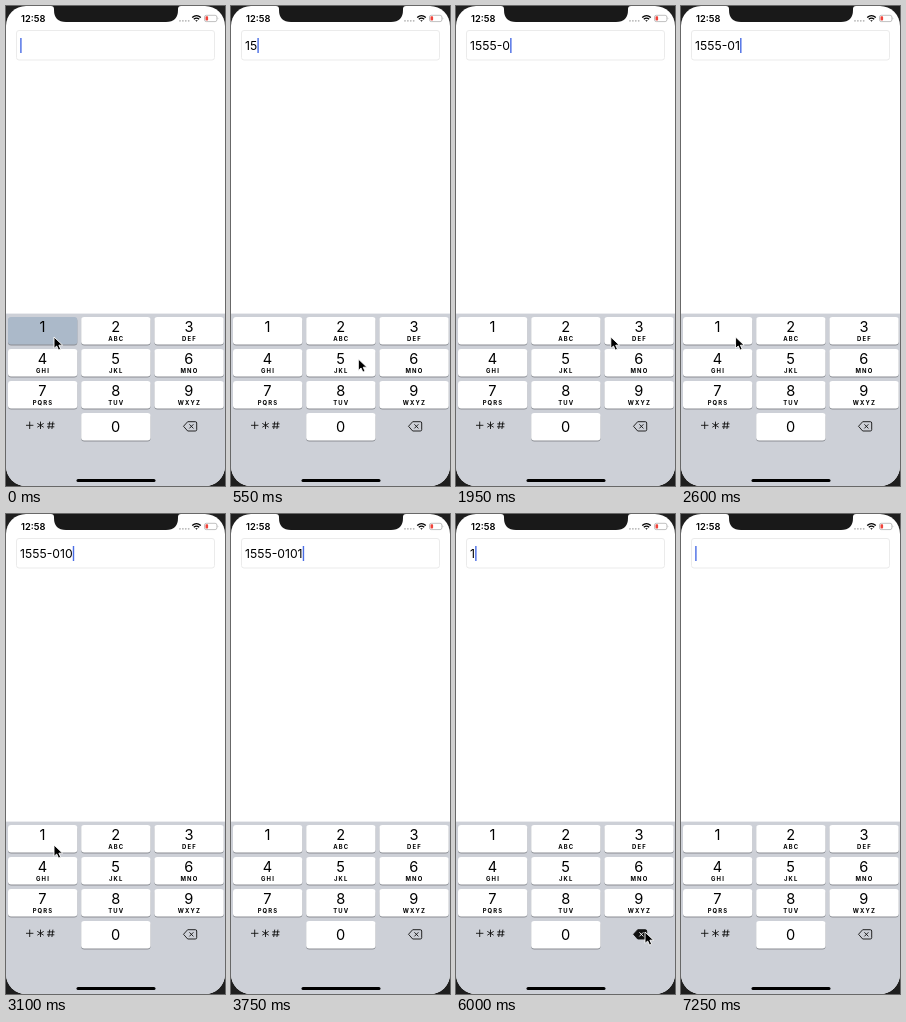
An HTML page that plays this animation: 219 by 480 pixels, repeating every 7350 ms.

```html
<!DOCTYPE html>
<html lang="en">
<head>
<meta charset="utf-8">
<title>Phone number field</title>
<style>
html, body { margin: 0; width: 100%; height: 100%; overflow: hidden; background: #1f1f1f; }
svg { display: block; width: 219px; height: 480px; font-family: Inter, sans-serif; }
</style>
</head>
<body>
<svg viewBox="0 0 219 480">
  <clipPath id="screen"><rect width="219" height="480" rx="20"/></clipPath>
  <g clip-path="url(#screen)">
    <rect width="219" height="480" fill="#fff"/>
    <rect y="307.6" width="219" height="173" fill="#cdd0d7"/>
  </g>
  <path d="M45 0Q48 0 48 3V4Q48 16 60 16H160Q172 16 172 4V3Q172 0 175 0Z" fill="#191919"/>
  <text x="15" y="15.6" font-size="9.3" font-weight="600">12:58</text>
  <path d="M174 14.8H183" stroke="#b5b5b5" stroke-width="1.8" stroke-linecap="round" stroke-dasharray="0 2.9"/>
  <path d="M186.2 11.6Q190.5 7.7 194.8 11.6M187.8 13.2Q190.5 10.9 193.2 13.2" fill="none" stroke="#000" stroke-width="1.3"/>
  <path d="M189.2 14.3H191.8L190.5 15.7Z"/>
  <rect x="198.5" y="9.3" width="12.4" height="6.3" rx="1.8" fill="none" stroke="#a5a5a5" stroke-width=".7"/>
  <rect x="199.5" y="10.3" width="2.6" height="4.3" rx=".8" fill="#f0433a"/>
  <path d="M211.7 11.3Q213 12.4 211.7 13.6Z" fill="#a5a5a5"/>
  <rect x="10.5" y="24.5" width="198" height="29.5" rx="2.5" fill="#fff" stroke="#ebebeb"/>
  <text id="field" x="14" y="44" font-size="12.2"></text>
  <rect id="caret" y="32" width="1.4" height="15" fill="#4a6de5"/>
  <g id="keys" text-anchor="middle"></g>
  <path d="M20 419.3H27.4M23.7 415.6V423M34.5 415.6V423M31.3 417.4L37.7 421.2M31.3 421.2L37.7 417.4M43.7 415.6L42.7 423M46.9 415.6L45.9 423M41.3 417.9H48.6M41 420.8H48.3" fill="none" stroke="#111" stroke-width=".9"/>
  <g stroke-width=".9" stroke-linejoin="round">
    <path id="del" d="M177.5 420.3L181.7 415.7H189.3Q190.7 415.7 190.7 417V423.7Q190.7 425 189.3 425H181.7Z" stroke="#111"/>
    <path id="cross" d="M183.4 418.3L187.4 422.4M187.4 418.3L183.4 422.4"/>
  </g>
  <rect x="70.5" y="473" width="79" height="3" rx="1.5"/>
  <path id="pointer" d="M0 0V11.4L2.7 9L4.5 13.1L6.7 12.2L4.9 8.2H8.6Z" stroke="#fff" stroke-width=".9"/>
</svg>
<script>
const LOOP = 7350, NUMBER = "15550101";
const HOLD = 100, GLIDE = 300, DELETE_START = 4900, DELETE_STEP = 175, POINTER_GONE = 6550;
const $ = id => document.getElementById(id);
const set = (id, name, value) => $(id).setAttribute(name, value);
const clamp = v => Math.max(0, Math.min(1, v));

// time, column and row of each tap
const taps = [[0, 0, 0], [400, 1, 1], [800, 2, 1], [1150, 2, 1], [1600, 2, 0], [2190, 1, 0], [2710, 0, 0], [3150, 0, 0]]
  .map(([t, col, row]) => ({ t, key: row * 3 + col + 1, x: 48 + col * 63, y: 331 + row * 22 }));
const stops = [...taps, { t: 3750, x: 300, y: 470 }, { t: 4400, x: 189, y: 418 }];

const typed = taps.map(tap => tap.t + HOLD);
const deleted = typed.map((_, i) => DELETE_START + i * DELETE_STEP);

function keyMarkup(digit, col, row, sub) {
  const x = 2 + col * 73.2, y = 311 + row * 32, mid = x + 34.5;
  return `<rect x="${x}" y="${y + 1}" width="69.3" height="27.5" rx="3" fill="#8b8e94"/>
    <rect id="key${digit}" x="${x}" y="${y}" width="69.3" height="27.5" rx="3"/>
    <text x="${mid}" y="${y + (digit ? 15.3 : 18.8)}" font-size="14.6">${digit}</text>
    <text x="${mid + .5}" y="${y + 23.8}" font-size="5.9" font-weight="700" letter-spacing="1.15">${sub}</text>`;
}
const letters = ["", "ABC", "DEF", "GHI", "JKL", "MNO", "PQRS", "TUV", "WXYZ"];
$("keys").innerHTML = letters.map((s, i) => keyMarkup(i + 1, i % 3, Math.floor(i / 3), s)).join("") + keyMarkup(0, 1, 3, "");

// Each glide ends just before its stop's time.
function pointerAt(t) {
  let { x, y } = stops[0];
  for (const stop of stops.slice(1)) {
    const u = clamp((t - stop.t + 50 + GLIDE) / GLIDE), ease = u * u * (3 - 2 * u);
    x += (stop.x - x) * ease;
    y += (stop.y - y) * ease;
  }
  return [x, y];
}

function caretOpacity(age) {
  if (age < 500) return 1;
  const phase = (age - 500) % 1000;
  return phase < 450 ? clamp(1 - phase / 200) : clamp((phase - 450) / 100);
}

function draw(t) {
  const past = times => times.filter(v => v <= t);
  const digits = NUMBER.slice(0, past(typed).length - past(deleted).length);
  $("field").textContent = digits.length > 4 ? digits.slice(0, 4) + "-" + digits.slice(4) : digits;
  set("caret", "x", 14.2 + (digits && $("field").getComputedTextLength()));
  set("caret", "opacity", caretOpacity(t - Math.max(0, ...past([...typed, ...deleted]))));

  const tap = taps.find(p => p.t <= t && t < p.t + HOLD);
  for (let d = 0; d < 10; d++) set("key" + d, "fill", tap && tap.key === d ? "#abb9c9" : "#fff");
  const deleting = t >= DELETE_START && t < deleted.at(-1);
  set("del", "fill", deleting ? "#111" : "none");
  set("cross", "stroke", deleting ? "#fff" : "#111");

  set("pointer", "visibility", t < POINTER_GONE ? "visible" : "hidden");
  set("pointer", "transform", `translate(${pointerAt(t)})`);
}

let start;
function tick(now) {
  start ??= now;
  draw(Math.max(0, now - start) % LOOP);
  requestAnimationFrame(tick);
}
draw(0);
requestAnimationFrame(tick);
</script>
</body>
</html>
```
